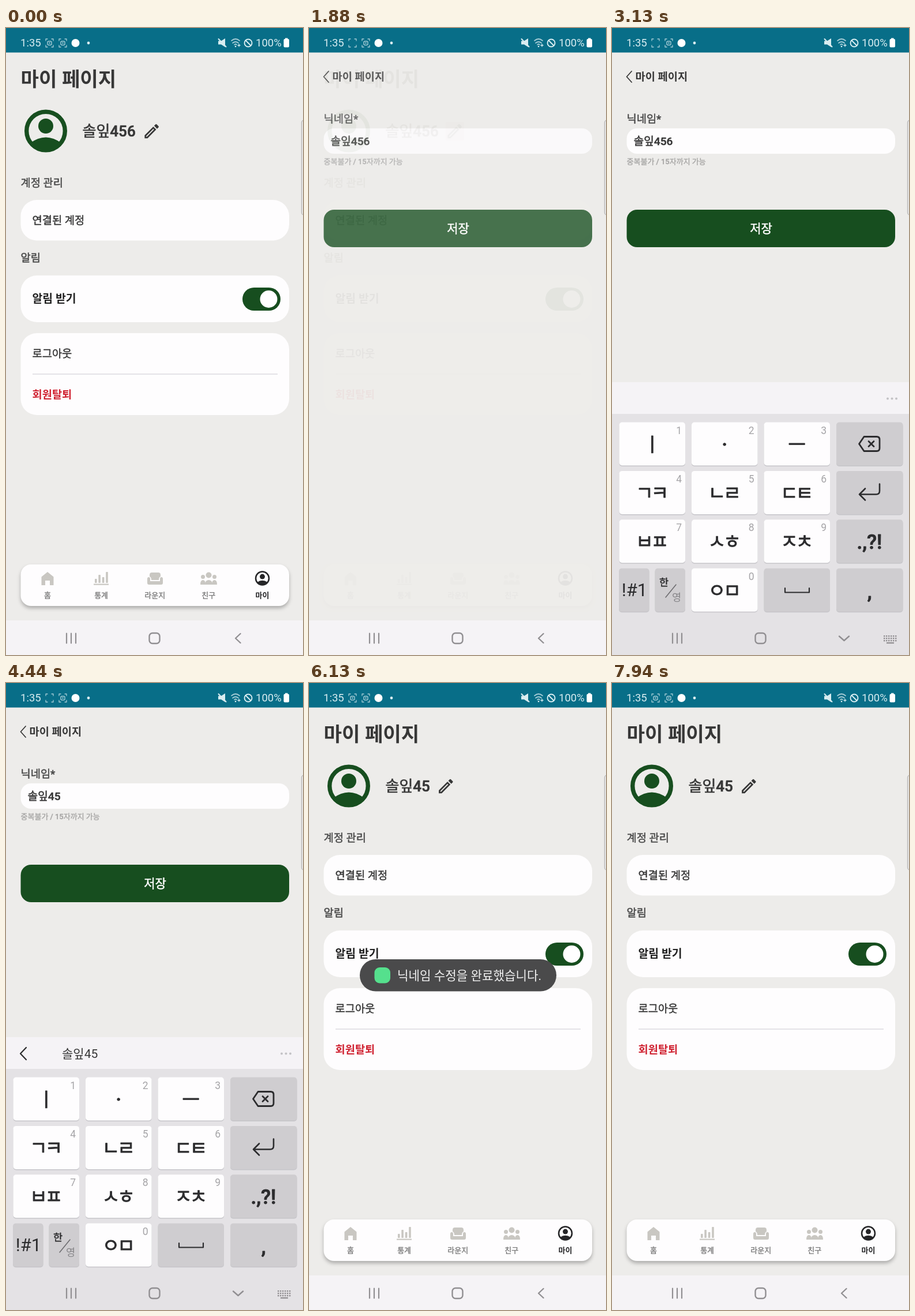
An HTML page that plays this animation: 515 by 1087 pixels, repeating every 8000 ms.

```html
<!DOCTYPE html>
<html lang="ko">
<head>
<meta charset="utf-8">
<title>마이 페이지</title>
<style>
  html, body { margin: 0; height: 100%; overflow: hidden; background: #edecea; }
  svg { display: block; width: 100%; height: 100%; }
  text { font-family: Roboto, "Noto Sans CJK KR", "Noto Sans CJK", sans-serif; white-space: pre; }
  .medium { stroke-width: .026em; stroke-linejoin: round; }
  .jamo { letter-spacing: -.13em; }
  .line { fill: none; stroke-linecap: round; stroke-linejoin: round; }
  #tabs { filter: drop-shadow(0 4px 3px #0004); }
</style>
</head>
<body>
<svg id="stage" viewBox="0 0 515 1087" preserveAspectRatio="none"></svg>
<script>
const LOOP = 8000;
const BG = '#edecea', CARD = '#fefdfe', GREEN = '#174e1f', INK = '#373737', GREY = '#c9c7c2', BAR = '#f5f3f6';
const NAME_LONG = '솔잎456', NAME_SHORT = '솔잎45';

// Medium weight is a thin outline, since the Korean font has only regular and bold.
const text = (x, y, size, str, fill = INK, weight = 500, anchor = 'start', names = '') => {
  const outline = weight === 500 ? `class="medium ${names}" stroke="${fill}"` : '';
  return `<text x="${x}" y="${y}" font-size="${size}" fill="${fill}" font-weight="${weight}" text-anchor="${anchor}" ${outline}>${str}</text>`;
};
const rect = (x, y, w, h, r, fill, extra = '') =>
  `<rect x="${x}" y="${y}" width="${w}" height="${h}" rx="${r}" fill="${fill}" ${extra}/>`;
const circle = (x, y, r, fill, extra = '') => `<circle cx="${x}" cy="${y}" r="${r}" fill="${fill}" ${extra}/>`;
const line = (d, stroke, width) => `<path class="line" d="${d}" stroke="${stroke}" stroke-width="${width}"/>`;
const group = (id, body) => `<g id="${id}">${body}</g>`;
const card = (y, h, r = 28, fill = CARD) => rect(25.5, y, 465.5, h, r, fill);
const at = (x, y, scale, body) => `<g transform="translate(${x} ${y}) scale(${scale})">${body}</g>`;

const person = (x, y, scale, color) => at(x, y, scale,
  circle(0, 0, 33.3, 'none', `stroke="${color}" stroke-width="7.4"`) + circle(0, -8.5, 13, color) +
  `<path fill="${color}" d="M-27 21Q0 1 27 21A34 34 0 0 1-27 21Z"/>`);

const pencil = x => at(x, 162.6, 1.36, `<path fill="${INK}" d="M14.06 9.02l.92.92L5.92 19H5v-.92l9.06-9.06M17.66 3c-.25 0-.51.1-.7.29l-1.83 1.83 3.75 3.75 1.83-1.83c.39-.39.39-1.02 0-1.41l-2.34-2.34c-.2-.2-.45-.29-.71-.29zm-3.6 3.19L3 17.25V21h3.75L17.81 9.94l-3.75-3.75z"/>`);

function statusBar() {
  const c = '#d9edf1', dim = '#a5cbd5';
  const corners = x => line(`M${x - 6.5} 22v-3h3m7 0h3v3m0 8v3h-3m-7 0h-3v-3`, dim, 1.3);
  const lens = x => rect(x - 3.5, 23, 7, 6.5, 2, 'none', `stroke="${dim}" stroke-width="1.4"`) + circle(x, 26, 1.2, dim);
  return rect(0, 0, 515, 42.5, 0, '#086e88') + text(25, 32, 18.5, '1:35', c, 400) +
    corners(75.5) + group('lens', lens(75.5)) + corners(98.5) + lens(98.5) +
    circle(120.5, 26, 7, '#fff') + circle(143, 26, 2.4, c) +
    `<path fill="${c}" d="M368 22.5h5l7-4.500v15l-7-4.500h-5z"/>` + line('M368.5 19l13 13.5', c, 2) +
    line('M391 22q7-6 14 0m-12 4q5-4 10 0m-7 3q2-2 4 0', dim, 1.7) + circle(398, 32, 1.3, c) +
    line('M404 28v4m2-2h-4', c, 1.3) +
    circle(420, 26, 6.5, 'none', `stroke="${c}" stroke-width="1.9"`) + line('M415.5 21.5l9 9', c, 1.9) +
    text(433, 32, 18.5, '100%', c, 400) + rect(481.5, 19, 9.5, 14.5, 2, '#fff') + rect(484, 17.5, 4.5, 3, 0, '#fff');
}

function tabs() {
  const bar = (x, y) => rect(x, y, 3.6, 962 - y, 0.8, GREY);
  const friend = (x, headY, r, half) => circle(x, headY, r, GREY) +
    `<path fill="${GREY}" d="M${x - half} 965v-2a${half} 6 0 0 1 ${half * 2} 0v2z"/>`;
  const labels = ['홈', '통계', '라운지', '친구', '마이'];
  return group('tabs', card(930, 72, 18)) +
    `<path fill="${GREY}" d="M61.5 951.5L72 943l10.5 8.5V966H76v-8h-8v8h-6.5z"/>` +
    bar(154, 955) + bar(160.3, 948) + bar(166.8, 952) + bar(173.2, 943) + rect(152, 963.5, 26, 2.2, 0, GREY) +
    `<path fill="${GREY}" d="M249 948q0-4 4-4h11q4 0 4 4v3q-3 1-3 6h-13q0-5-3-6z"/>` +
    `<path fill="${GREY}" d="M245 955q0-3 2.5-3t2.5 3v4h17v-4q0-3 2.5-3t2.5 3v7q0 3-3 3h-21q-3 0-3-3z"/>` +
    friend(341.5, 951.5, 3.5, 4.4) + friend(361.5, 951.5, 3.5, 4.4) + friend(351.5, 948.5, 5, 6.3) +
    person(444.5, 954, 0.345, '#252527') +
    labels.map((s, i) => text(72 + i * 93.1, 988, 13, s, i < 4 ? '#777' : '#252527', i < 4 ? 500 : 700, 'middle')).join('');
}

const profileName = (id, name, pencilX) => group(id, text(132.5, 188, 26, name) + pencil(pencilX));

const myPage = () => rect(0, 42, 515, 985, 0, BG) +
  text(25.5, 101, 34.2, '마이 페이지', INK, 700) + person(69, 178.5, 1, GREEN) +
  group('press', rect(237, 163, 31.5, 32, 1, '#000', 'opacity=".13"')) +
  profileName('nameLong', NAME_LONG, 236.3) + profileName('nameShort', NAME_SHORT, 221) +
  text(25.5, 274.5, 18.7, '계정 관리', '#4a4a4a') +
  card(298, 70.5) + text(45.5, 340, 18.7, '연결된 계정') +
  text(25.5, 405, 18.7, '알림', '#4a4a4a') +
  card(429, 81) + text(45.5, 476, 19.4, '알림 받기', '#222', 700) +
  rect(410, 450, 66, 40, 20, GREEN) + circle(455.5, 470, 15, '#fff') +
  card(529, 142) + text(45.5, 570.5, 18.7, '로그아웃') + rect(46, 599.2, 425, 1.6, 0, '#dedde1') +
  text(45.5, 642, 18.7, '회원탈퇴', '#d02332', 700) + tabs();

const editPage = () => rect(0, 42, 515, 985, 0, BG) +
  line('M34 75l-8.5 9.5 8.5 9.5', INK, 1.8) + text(40.5, 91, 18.7, '마이 페이지', INK, 700) +
  text(25.5, 164, 18.7, '닉네임*', '#4a4a4a') + card(174, 44, 18) +
  group('fieldLong', text(37.5, 202.5, 19.2, NAME_LONG)) + group('fieldShort', text(37.5, 202.5, 19.2, NAME_SHORT)) +
  text(25.5, 236, 13, '중복불가 / 15자까지 가능', '#a5a4a3') +
  card(315, 65, 18, GREEN) + text(258.5, 354.5, 21, '저장', '#fff', 500, 'middle');

function keyboard() {
  const dark = '#cfcdd0', ink = '#2c2c2e';
  const key = (x, y, w, fill) => rect(x, y + 1.5, w, 75, 5, '#c6c5c9') + rect(x, y, w, 75, 5, fill);
  const colX = i => 12.5 + i * 125.5, rowY = i => 683.5 + i * 84.4;
  const letter = (str, n, col, row) => key(colX(col), rowY(row), 114.5, CARD) +
    text(colX(col) + 55, rowY(row) + 50, 33.5, str, ink, 500, 'middle', 'jamo') +
    text(colX(col) + 108.5, rowY(row) + 20, 17.5, n, '#a5a4a7', 400, 'end');
  const letters = ['ㅣ', '·', 'ㅡ', 'ㄱㅋ', 'ㄴㄹ', 'ㄷㅌ', 'ㅂㅍ', 'ㅅㅎ', 'ㅈㅊ'];
  const dots = [0, 1, 2].map(i => circle(478 + i * 7.5, 642.5, 2, '#c3c2c5')).join('');
  return rect(0, 614, 515, 56, 0, BAR) + rect(0, 669, 515, 418, 0, '#e4e2e5') + dots +
    group('suggestion', line('M35 632l-10 10.5 10 10.5', ink, 2.2) + text(97, 650, 21, NAME_SHORT, INK, 400)) +
    letters.map((s, i) => letter(s, i + 1, i % 3, i / 3 | 0)).join('') + letter('ㅇㅁ', 0, 1, 3) +
    [0, 1, 2, 3].map(i => key(colX(3), rowY(i), 115.5, dark)).join('') +
    key(12, rowY(3), 52.5, dark) + key(74.5, rowY(3), 52.5, dark) + key(colX(2), rowY(3), 114.5, dark) +
    group('backspace', rect(colX(3), rowY(0), 115.5, 75, 5, '#b9b7bb')) +
    line('M437 708.5h22q5 0 5 5v15q0 5-5 5h-22l-8.5-12.5z M445 716.5l9 9m0-9l-9 9', ink, 2.8) +
    line('M464 790.5v12q0 6-6 6h-28m9-10l-10 10 10 10', ink, 2.6) +
    text(446.5, 903, 35, '.,?!', ink, 500, 'middle') + text(446.5, 989, 35, ',', ink, 500, 'middle') +
    text(39, 985, 31, '!#1', ink, 400, 'middle') +
    text(90, 967, 17.5, '한', ink, 500, 'middle') + text(112, 993, 17.5, '영', '#858487', 400, 'middle') +
    line('M93 987l18-22', '#6d6c6f', 1.6) + line('M300 971v7.5h42V971', ink, 2.2);
}

function navBar() {
  const c = '#918f92';
  const keys = [0, 1, 2].map(row => [0, 1, 2, 3, 4, 5].map(i =>
    rect(471 + i * 4, 1053 + row * 4, 2.4, 2.4, 0, c)).join('')).join('');
  return group('navFill', rect(0, 1027, 515, 60, 0, BAR)) +
    line('M105 1049.5v17m8-17v17m8-17v17', c, 2.2) +
    rect(248.5, 1049, 18, 18, 5.5, 'none', `stroke="${c}" stroke-width="2.4"`) +
    group('back', line('M406.5 1050l-8.5 8 8.5 8', c, 2.4)) +
    group('down', line('M394 1054.5l8.5 7.5 8.5-7.5', c, 2.4) + keys + rect(476, 1065, 13, 2.2, 0, c));
}

const toast = () => rect(88, 479, 341, 55.5, 27.7, '#4a4a4b') + rect(113.5, 493, 27.5, 27.5, 9, '#55e08d') +
  text(153, 515, 21.2, '닉네임 수정을 완료했습니다.', '#f1f1f1', 400);

document.getElementById('stage').innerHTML = rect(0, 0, 515, 1087, 0, BG) +
  group('my', myPage()) + group('edit', editPage()) +
  rect(512.5, 160, 8, 164, 4, '#e6e5e4', 'stroke="#b9b8b8" stroke-width="1.3"') +
  group('keyboard', keyboard()) + navBar() + group('toast', toast()) + statusBar();

const FADE = 'cubic-bezier(.4,0,.2,1)', HOLD = 'step-end';

// Each step is [time, value, easing towards the next step].
function play(id, property, steps) {
  const last = steps[steps.length - 1];
  const frames = [...steps, [LOOP, last[1]]].map(([time, value, easing = 'linear']) =>
    ({ offset: time / LOOP, [property]: value, easing }));
  document.getElementById(id).animate(frames, { duration: LOOP, iterations: Infinity });
}
const show = (id, from, to = LOOP) => play(id, 'opacity', [[0, 0, HOLD], [from, 1, HOLD], ...(to < LOOP ? [[to, 0, HOLD]] : [])]);
const hide = (id, from, to = LOOP) => play(id, 'opacity', [[0, 1, HOLD], [from, 0, HOLD], ...(to < LOOP ? [[to, 1, HOLD]] : [])]);

play('my', 'opacity', [[0, 1], [1530, 1, FADE], [2230, 0], [5040, 0, FADE], [5740, 1]]);
play('edit', 'opacity', [[0, 0], [1530, 0, FADE], [2230, 1], [5040, 1, FADE], [5740, 0]]);
play('keyboard', 'transform', [[0, 'translateY(473px)'], [2560, 'translateY(473px)', 'cubic-bezier(.2,.6,.3,1)'],
  [2840, 'translateY(0px)'], [5500, 'translateY(0px)', FADE], [5760, 'translateY(473px)']]);
play('toast', 'opacity', [[0, 0], [4960, 0], [5370, 1], [7080, 1], [7420, 0]]);

show('press', 1440, 2230);
show('backspace', 3500, 3640);
show('suggestion', 3810, 5800);
show('fieldShort', 3560);
hide('fieldLong', 3560);
show('nameShort', 3560);
hide('nameLong', 3560);
show('down', 2620, 5640);
hide('back', 2620, 5640);
hide('navFill', 2620, 5700);
hide('lens', 1440, 5560);
</script>
</body>
</html>
```
